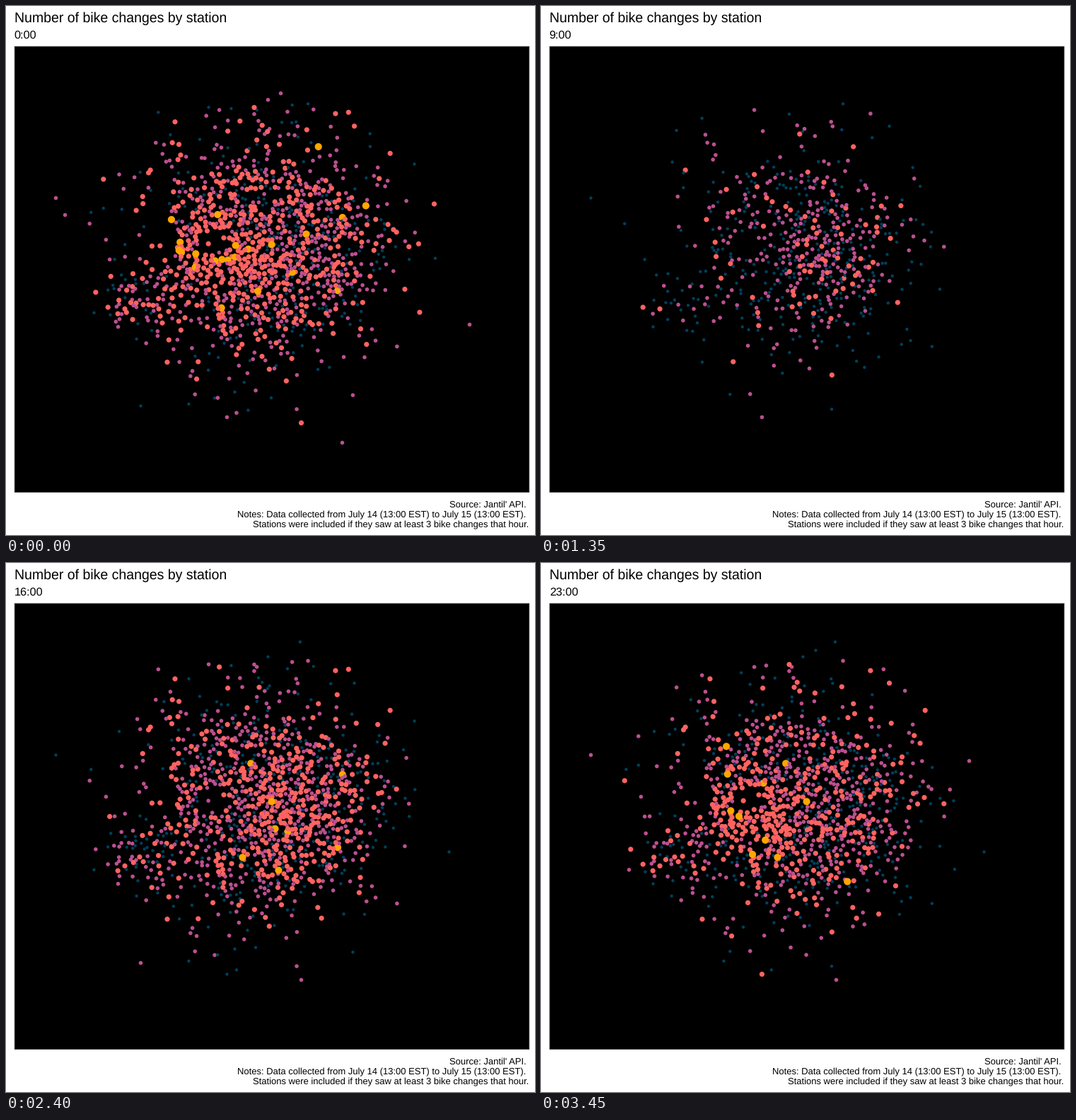
Recreate the animation shown at these times as a matplotlib script. Size 748 by 748 pixels, loop 3.6 s.

```python
import numpy as np
import matplotlib.pyplot as plt
from matplotlib.animation import FuncAnimation
from matplotlib.patches import Rectangle

SIZE, DPI = 748, 64          # 748 / 64 is exact in binary
PT = 72 / DPI                # points per pixel
HOURS, STEP_MS = 24, 150
STATIONS = 1430
CENTER, RADII = np.array([362, 345]), np.array([118, 110])
DOWNTOWN, RIVERSIDE, SUBURB = (388, 340), (298, 355), (192, 415)

COLORS = np.array(["#003f5c", "#bc5090", "#ff6361", "#ffa600"])
DIAMETERS = np.array([4.4, 5.6, 7.2, 10.2])
THRESHOLDS = np.array([0, 0.58, 1.48, 3.5])

# Citywide activity over the day; 13:00 was recorded twice, hence the spike.
CURVE = [(0, 0.95), (3, -0.1), (6, -0.8), (9, -0.13), (12, 0.75), (13, 1.62),
         (14, 0.9), (16, 0.93), (19, 1.18), (23, 0.65)]

# The farthest stations fix the extent of the map.
FARTHEST = [(70, 271), (83, 295), (214, 100), (388, 123), (577, 223),
            (629, 339), (626, 408), (655, 450), (475, 617), (417, 589),
            (190, 565), (95, 502)]
# Parks and other thinly served areas: x, y, half width, half height.
GAPS = [(215, 335, 26, 44), (293, 332, 23, 20), (545, 432, 34, 32)]

rng = np.random.default_rng(14)


def radius(points):
    return np.hypot(*((points - CENTER) / RADII).T)


def candidate():
    kind = rng.random()
    if kind < 0.04:
        return rng.normal(SUBURB, 20)
    if kind < 0.32:
        return rng.normal(DOWNTOWN, 55)
    r = np.sqrt(rng.random()) if kind < 0.70 else 0.95 + rng.exponential(0.48)
    a = rng.uniform(0, 2 * np.pi)
    return CENTER + RADII * r * np.array([np.cos(a), np.sin(a)])


def in_gap(p):
    return any(((p[0] - x) / w) ** 2 + ((p[1] - y) / h) ** 2 < 1
               for x, y, w, h in GAPS)


def place_stations():
    placed = np.zeros((STATIONS, 2))
    n = len(FARTHEST)
    placed[:n] = FARTHEST
    while n < STATIONS:
        p = candidate()
        near = np.hypot(*(placed[:n] - p).T).min() < 4.3
        thinned = in_gap(p) and rng.random() < 0.85
        if not near and not thinned and radius(p) < 2.2:
            placed[n] = p
            n += 1
    return placed


def hotspot(center, spread):
    return np.exp(-0.5 * (np.hypot(*(stations - center).T) / spread) ** 2)


stations = place_stations()
habit = rng.normal(0, 0.65, STATIONS) - 0.4 * np.maximum(radius(stations) - 1, 0)
noise = rng.normal(0, 0.5, (HOURS, STATIONS))
downtown, riverside = hotspot(DOWNTOWN, 48), hotspot(RIVERSIDE, 40)


def levels(hour):
    """Activity level of every station, -1 where it is left out."""
    to_fireworks = (hour - 23.4 + 12) % 24 - 12
    night = np.exp(-0.5 * to_fireworks ** 2)
    score = habit + noise[hour] + 0.8 * (1 - night) * downtown
    score = (score - score.mean()) / score.std()
    score += np.interp(hour, *zip(*CURVE), period=24) + 2.1 * night * riverside
    return np.searchsorted(THRESHOLDS, score) - 1


plt.rcParams["font.family"] = "Liberation Sans"
plt.rcParams["text.hinting"] = "none"
fig = plt.figure(figsize=(SIZE / DPI, SIZE / DPI), dpi=DPI, facecolor="white")
ax = fig.add_axes([0, 0, 1, 1])
ax.set(xlim=(0, SIZE), ylim=(SIZE, 0))
ax.axis("off")
ax.add_patch(Rectangle((12.3, 57.3), 727.4, 630.2, facecolor="black",
                       edgecolor="#333333", lw=PT, snap=False))


def label(x, y, text, px, align="left"):
    return ax.text(x, y, text, fontsize=px * PT, ha=align, va="baseline",
                   color="black")


label(11.7, 22.5, "Number of bike changes by station", 19.55)
clock = label(11.7, 46, "", 16.3)
label(735.5, 709, "Source: Jantil' API.", 13.04, "right")
label(735.5, 723, "Notes: Data collected from July 14 (13:00 EST) "
      "to July 15 (13:00 EST).", 13.04, "right")
label(739, 737, "Stations were included if they saw at least "
      "3 bike changes that hour.", 13.04, "right")
dots = ax.scatter([], [], linewidths=0)


def update(hour):
    level = levels(hour)
    shown = level >= 0
    dots.set_offsets(stations[shown] + 0.5)
    dots.set_sizes((DIAMETERS[level[shown]] * PT) ** 2)
    dots.set_facecolor(COLORS[level[shown]])
    clock.set_text(f"{hour}:00")
    return dots, clock


anim = FuncAnimation(fig, update, frames=HOURS, interval=STEP_MS,
                     repeat=True, repeat_delay=0)
plt.show()
```
